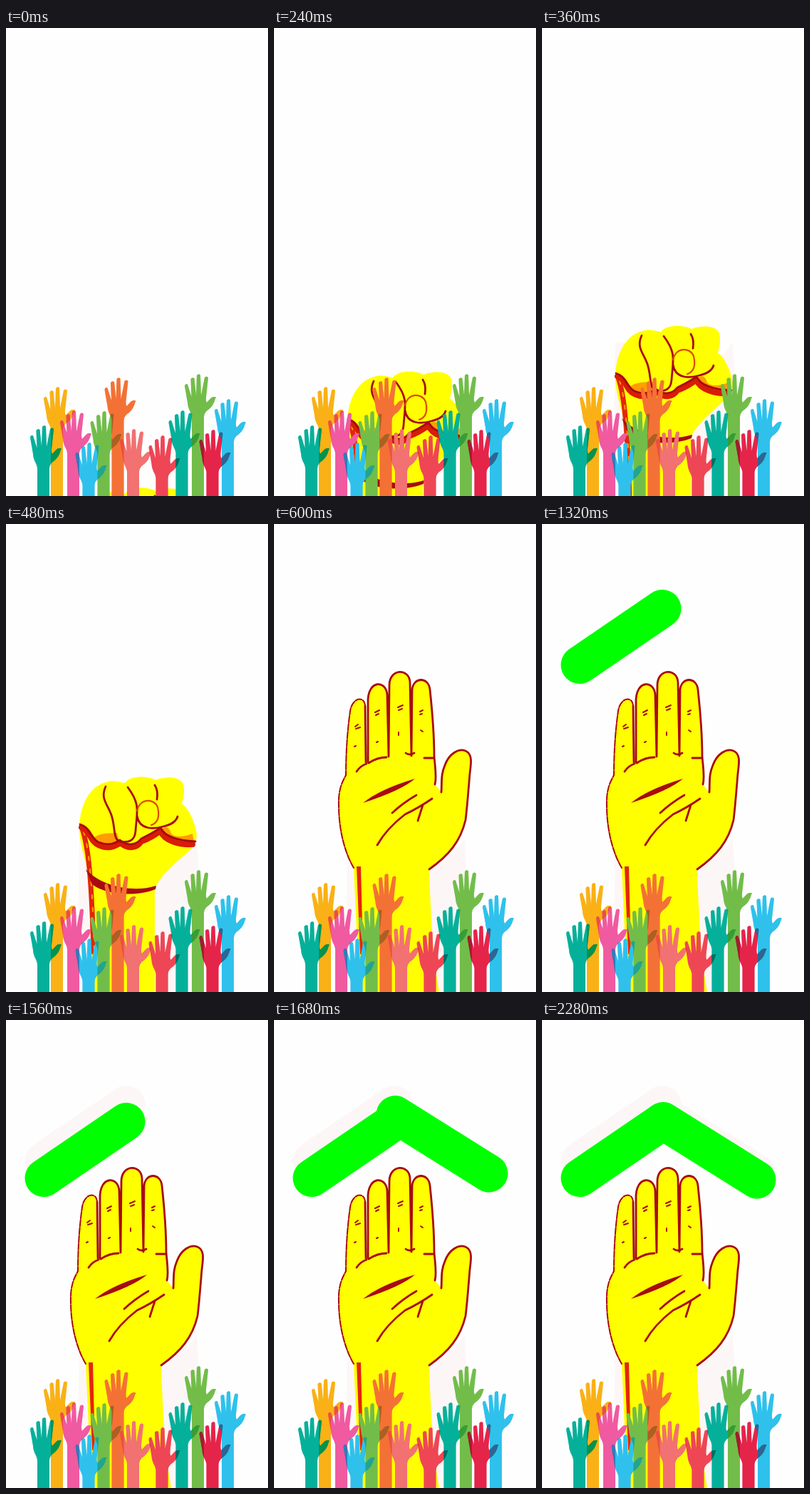
Animation, 368 px wide and 656 px high, one loop 5.28 s. Source, as an HTML page:

```html
<!DOCTYPE html>
<html lang="en">
<head>
<meta charset="utf-8">
<title>Raised hands</title>
<style>
html, body { margin: 0; width: 100%; height: 100%; overflow: hidden; background: #fefefe; }
svg { display: block; width: 100%; height: 100%; }

.fist, .palm, .left, .right, .trail { animation: 5.28s step-end infinite; }
.fist { animation-name: rise; }
.palm { animation-name: open; }
.left { animation-name: drop-left; }
.right { animation-name: drop-right; }
.trail.arm { animation-name: trail-arm; }
.trail.first { animation-name: trail-first; }
.trail.second { animation-name: trail-second; }

/* One step lasts 120 ms, 2.27% of the loop */
@keyframes rise {
  0% { transform: translateY(290px); opacity: 1; }
  2.27% { transform: translateY(208px); opacity: 1; }
  4.54% { transform: translateY(127px); opacity: 1; }
  6.81% { transform: translateY(63px); opacity: 1; }
  9.09% { transform: none; opacity: 1; }
  11.36%, 100% { transform: none; opacity: 0; }
}
@keyframes open { 0% { opacity: 0; } 11.36%, 100% { opacity: 1; } }
@keyframes drop-left {
  0% { opacity: 0; transform: translateY(-24px); }
  24.99% { opacity: 1; transform: translateY(-24px); }
  27.27% { opacity: 1; transform: translateY(-12px); }
  29.54%, 100% { opacity: 1; transform: none; }
}
@keyframes drop-right {
  0% { opacity: 0; transform: translateY(-9px); }
  31.81% { opacity: 1; transform: translateY(-9px); }
  34.09%, 100% { opacity: 1; transform: none; }
}
@keyframes trail-arm { 0% { opacity: 0; } 6.81%, 100% { opacity: 1; } }
@keyframes trail-first { 0% { opacity: 0; } 27.27%, 100% { opacity: 1; } }
@keyframes trail-second { 0% { opacity: 0; } 34.09%, 100% { opacity: 1; } }

.bar { fill: none; stroke: #0f0; stroke-width: 53; stroke-linecap: round; }
.trail { fill: #fdf6f7; }
.bar.trail { fill: none; stroke: #fdf6f7; }
.skin { fill: #ff0; }
.shade { fill: #ff9d00; }
.red { fill: #e2260a; }
.dark { fill: #a80a12; }
.ink { fill: none; stroke: #a80a12; stroke-width: 2.8; stroke-linecap: round; stroke-linejoin: round; }
.thin { stroke-width: 2; }
.broken { stroke-dasharray: 9 2; }
.side { stroke: #e2260a; stroke-width: 7; }
.flecks { stroke: #ff9d00; stroke-width: 2; stroke-dasharray: 5 13; }
.knuckles { stroke: #d81c06; stroke-width: 8; }
.nail { stroke: #e04a00; stroke-width: 2.2; }
.crowd { isolation: isolate; }
.crowd .overlap { mix-blend-mode: multiply; }
.crowd .tint { opacity: .45; }
</style>
</head>
<body>
<svg viewBox="0 0 368 656" preserveAspectRatio="none">
  <defs>
    <path id="hand" d="M-8.5 180V60C-9 53-14 50-14.5 40L-18.5 17Q-18 13-14.5 14.5L-9 32L-10 7Q-8 4-5 6L-2.5 30L-1.5 2Q1 -1 3.5 1.5L4.5 30L9.5 5Q12 2 14.5 5L11.5 33Q11 38 12.5 40L18 34Q21 31 25.5 32.5Q24 35 23 39Q20 47 12 52Q9 55 8.5 60V180Z"/>
  </defs>

  <path class="trail arm" d="M103 440L255 458L268 440L270 480V656H100Z"/>
  <path class="bar trail first" d="M53 197.5L169 118.5"/>
  <path class="bar trail second" d="M170 132.5L302 215"/>

  <g class="fist">
    <path class="skin" d="M103 425C104 390 120 367 140 362C150 358 160 362 167 363C175 352 200 353 210 359C225 353 245 354 249 365C252 378 248 388 247 392C258 400 266 420 268 435C268 445 262 455 255 460C235 478 215 495 209 512V900H122L118 500C112 470 103 450 103 425Z"/>
    <path class="shade" d="M122 441C132 432 145 434 156 433L160 446C148 452 133 451 122 441ZM218 428Q228 420 232 434Q240 442 262 434L264 447Q228 448 218 428Z"/>
    <path class="ink side" d="M107 427C115 450 120 490 123 600"/>
    <path class="ink flecks" d="M109 431C116 455 121 490 124 600"/>
    <path class="ink knuckles" d="M106 425C119 430 117 444 130 450C145 457 154 451 161 447C172 457 184 454 190 445Q204 440 217 430C222 445 245 450 262 449"/>
    <path class="ink" d="M104 421C118 425 118 440 130 446C145 452 154 447 160 443C172 453 184 449 190 441Q203 435 217 426C224 440 245 444 266 445"/>
    <path class="ink" d="M140 368C132 385 143 393 148 408C154 425 150 442 160 445C173 447 181 444 182 430C184 402 189 393 171 369M184 409C187 429 208 428 221 424Q238 420 241 410M209 366Q214 374 212 386"/>
    <path class="ink nail" d="M184 402C188 384 208 384 213 397C217 414 210 420 204 422"/>
    <path class="dark" d="M112 484C135 509 180 517 211 507L210 512C182 523 140 520 121 505Z"/>
  </g>

  <g class="palm">
    <path class="skin" d="M112 482C100 462 91 430 91 395C90 370 97 360 101 352C101 320 103 290 107 262C110 243 127 240 128 255L129 334L132 334V250C131 218 158 218 159 240L161 326L162 225C163 202 190 202 191 222L193 325L194 232C196 214 217 214 219 232C222 260 225 290 225 325C226 340 229 355 226 365L235 376C236 362 234 352 240 338C246 322 259 314 269 318C279 322 277 335 275 350C273 375 271 400 269 415C262 445 245 465 218 484C220 540 222 600 232 656H125L116 570Z"/>
    <path class="ink thin broken" d="M112 482C100 462 91 430 91 395C90 370 97 360 101 352C101 320 103 290 107 262C110 243 127 240 128 255"/>
    <path class="ink" d="M128 255L129 334M132 334V250C131 218 158 218 159 240L161 326L162 225C163 202 190 202 191 222L193 325L194 232C196 214 217 214 219 232C222 260 225 290 225 325C226 340 229 355 226 365"/>
    <path class="ink" d="M235 376C236 362 234 352 240 338C246 322 259 314 269 318C279 322 277 335 275 350C273 375 271 400 269 415C262 445 245 465 218 484"/>
    <path class="ink" d="M116 347Q121 339 130 336M133 335Q145 327 158 327M185 321Q190 325 197 321M211 328H224M166 405Q181 391 200 380M145 450Q158 427 184 407Q203 398 222 385M202 416L209 394"/>
    <path class="dark" d="M125 391Q148 372 198 357Q180 373 125 391Z"/>
    <path class="ink thin" d="M114 284L118 281M115 287L121 285M113 312L115 311M142 264L148 261M143 268L147 266M144 306L146 305M174 257L181 254M175 261L180 259M175 292V296M205 263L209 261M205 267L208 266M206 289L209 291"/>
    <path class="red" d="M116 480H122L125 603H121Z"/>
  </g>

  <path class="bar left" d="M53 221.5L169 142.5"/>
  <path class="bar right" d="M170 141.5L302 224"/>

  <g class="crowd"></g>
</svg>
<script>
const crowd = document.querySelector('.crowd');
const teal = '#05b09b', green = '#72bd4b', blue = '#2fc0ec';
const hands = [
  [71.5, 503, '#f9b116'], [52.5, 557, teal], [94.5, 536, '#f05aa0'],
  [137, 537, green], [116, 581, blue], [157, 490, '#f37135'],
  [178.5, 562, '#f17171'], [219, 571, '#ee4655'], [247, 536, teal],
  [269.5, 485, green], [290, 563, '#e4254a'], [311.5, 520, blue]
];

function addHand(x, y, fill, layer) {
  const hand = document.createElementNS(crowd.namespaceURI, 'use');
  hand.setAttribute('href', '#hand');
  hand.setAttribute('transform', `translate(${x} ${y})`);
  hand.setAttribute('fill', fill);
  hand.setAttribute('class', layer);
  crowd.append(hand);
}

// A translucent copy softens the multiplied overlap
for (const hand of hands) {
  addHand(...hand, 'overlap');
  addHand(...hand, 'tint');
}
</script>
</body>
</html>
```
